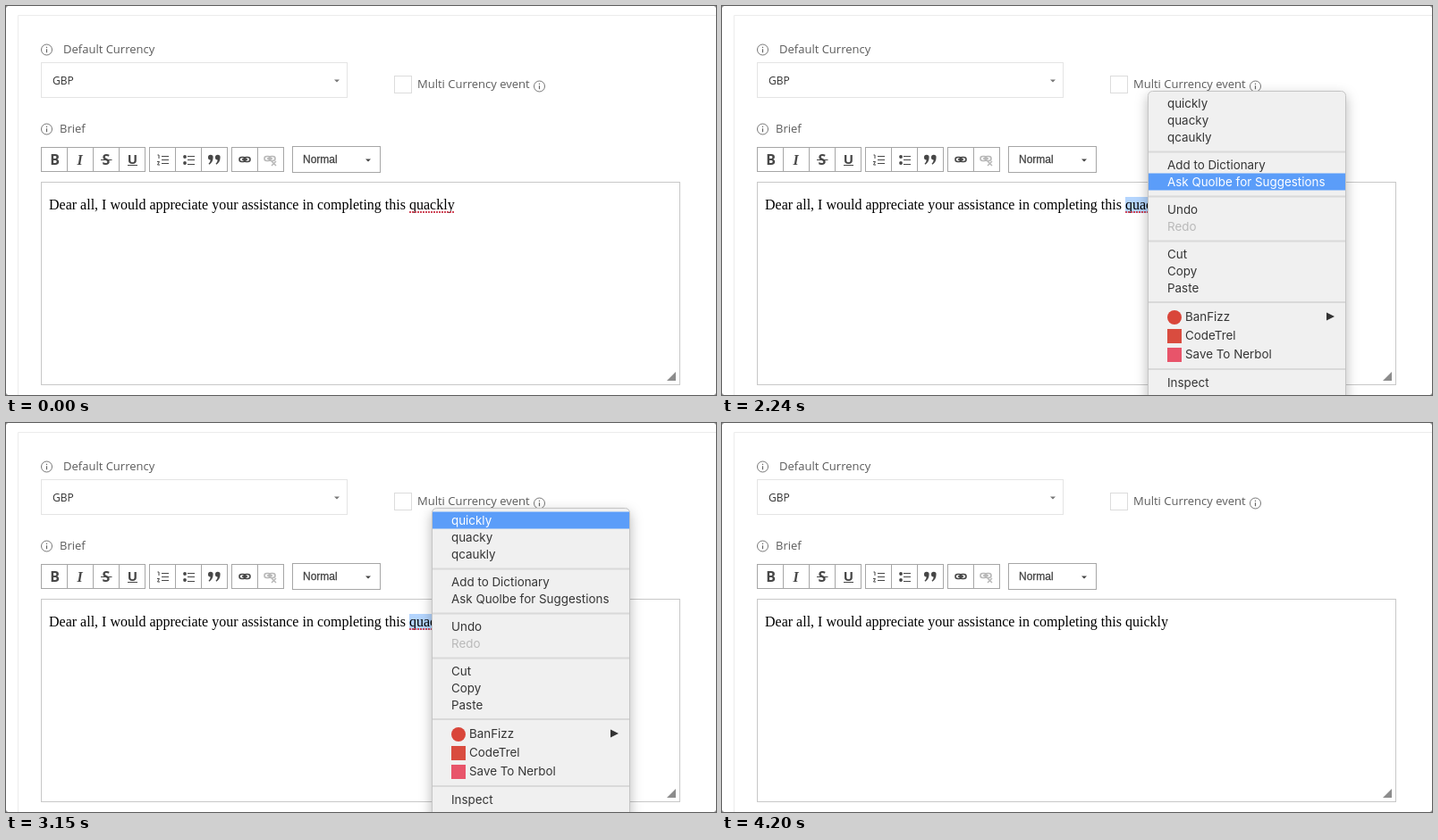
Animation of 794 by 436 pixels, one loop 4620 ms. Source, as an HTML page:

```html
<!DOCTYPE html>
<html lang="en">
<head>
<meta charset="utf-8">
<title>Spelling correction</title>
<style>
  html, body { margin: 0; width: 100%; height: 100%; overflow: hidden; background: #fff; }
  svg { display: block; width: 794px; height: 436px; }
  .label { font: 13px "Open Sans", sans-serif; fill: #5c5c5c; }
  .value { font: 12px "Open Sans", sans-serif; fill: #333; }
  .style { font: 12px "Liberation Sans", Arial, sans-serif; fill: #444; stroke: #444; stroke-width: .3; }
  .body { font: 16px "Liberation Serif", Times, serif; font-kerning: none; fill: #000; }
  .tool { font: bold 16px "Open Sans", sans-serif; fill: #474747; text-anchor: middle; }
  .item { font: 13.4px Inter, sans-serif; }
  .box { fill: #fff; stroke: #a6a6a6; }
  .icon { fill: none; stroke: #474747; }
  #menu { filter: drop-shadow(0 5px 7px rgba(0, 0, 0, .28)); }
</style>
</head>
<body>
<svg viewBox="0 0 794 436" xmlns="http://www.w3.org/2000/svg">
  <defs>
    <g id="info">
      <circle r="6" fill="none" stroke="#777"/>
      <path d="M0-3.2v1.3M0-.8v4" stroke="#666" stroke-width="1.2"/>
    </g>
    <g id="link" fill="none" stroke-width="1.6">
      <rect x="-6" y="-2.5" width="7" height="5" rx="2.5"/>
      <rect x="-1" y="-2.5" width="7" height="5" rx="2.5"/>
      <path d="M-3 0H3"/>
    </g>
    <path id="down" d="M-3-1.5h6L0 1.5z"/>
  </defs>

  <rect width="794" height="436" fill="#fff"/>
  <path d="M13.5 436V10.5H794" fill="none" stroke="#ececec"/>
  <path d="M0 0h2L0 2zM794 0v2l-2-2zM0 436v-2l2 2zM794 436h-2l2-2z" fill="#999"/>

  <use href="#info" x="45.5" y="49"/>
  <text class="label" x="64" y="53">Default Currency</text>
  <rect x="39.5" y="63.5" width="342" height="39" fill="#fff" stroke="#e4e4e4"/>
  <text class="value" x="52" y="88">GBP</text>
  <use href="#down" x="370" y="84" fill="#777"/>
  <rect x="434.5" y="78.5" width="19" height="19" fill="#fff" stroke="#dcdcdc"/>
  <text class="label" x="460" y="92">Multi Currency event</text>
  <use href="#info" x="596.5" y="90"/>
  <use href="#info" x="45.5" y="138"/>
  <text class="label" x="60" y="142">Brief</text>

  <g id="tools"></g>
  <g class="tool">
    <text x="54.5" y="178">B</text>
    <text x="82.5" y="178" font-family="'Liberation Serif', serif" font-style="italic">I</text>
    <text x="112" y="178">S</text>
    <text x="141.5" y="177" style="font-size:15px">U</text>
  </g>
  <path class="icon" d="M106 172.5h12.5M136 178.5h11" stroke-width="1.2"/>
  <path class="icon" d="M174 168.5h8M174 172.5h8M174 176.5h8M203 168.5h8M203 172.5h8M203 177.5h8"/>
  <path class="icon" d="M169.5 167h1.5v4M169 174.500h2.500l-2 3.500h2.500"/>
  <g fill="#474747">
    <circle cx="200" cy="169" r="1.9"/>
    <circle cx="200" cy="176" r="1.9"/>
    <path id="comma" d="M226 169.500a2.800 2.800 0 1 1 5.600 0c0 4-1.600 6.500-4.300 8.300l-.8-1c1.500-1.500 2-2.700 2.100-4.400a2.700 2.700 0 0 1-2.600-2.900z"/>
    <use href="#comma" x="8"/>
  </g>
  <use href="#link" x="267" y="172" stroke="#474747"/>
  <g stroke="#b8b8b8">
    <use href="#link" x="295" y="171"/>
    <path d="M297 174l5 5m0-5l-5 5" stroke-width="1.5"/>
  </g>
  <rect class="box" x="320.500" y="157.500" width="98" height="29"/>
  <text class="style" x="332" y="176">Normal</text>
  <use href="#down" x="405" y="173" fill="#444"/>

  <rect x="39.500" y="197.500" width="714" height="227" fill="#fff" stroke="#c8c8c8"/>
  <path d="M749 410v10h-10z" fill="#8c8c8c"/>
  <rect id="selection" x="451" y="214" width="51" height="18" fill="#b4d5fe"/>
  <text class="body" x="48" y="228">Dear all, I would appreciate your assistance in completing this</text>
  <g id="wrong">
    <text class="body" x="451" y="228">quackly</text>
    <path d="M451 231H501" stroke="#d0485a" stroke-width="2" stroke-dasharray="2 1"/>
  </g>
  <text class="body" id="right" x="451" y="228">quickly</text>
  <rect id="caretMid" x="474" y="214" width="1" height="18"/>
  <rect id="caretEnd" x="499" y="214" width="1" height="18"/>

  <g id="menu">
    <rect x="476.500" y="95.500" width="221" height="360" rx="5" fill="#f0f0f0" stroke="#c4c4c4"/>
    <path d="M477 163.500h220m-220 50h220m-220 50h220m-220 68.500h220m-220 75h220" stroke="#d9d9d9" stroke-width="2"/>
    <g id="items"></g>
    <circle cx="506" cy="349" r="8" fill="#d9463a"/>
    <rect x="498" y="362" width="16" height="16" fill="#d94c3f"/>
    <rect x="498" y="383" width="16" height="16" fill="#e8546a"/>
    <path d="M676 343.500l9 4.500-9 4.500z" fill="#333"/>
  </g>
</svg>

<script>
const LOOP = 4620;
const byId = id => document.getElementById(id);

function add(parent, tag, attrs, text = '') {
  const el = document.createElementNS('http://www.w3.org/2000/svg', tag);
  for (const name in attrs) el.setAttribute(name, attrs[name]);
  el.textContent = text;
  parent.append(el);
  return el;
}

// Plays a table of [time, value] steps with hard changes.
function play(el, prop, steps) {
  const frames = [...steps, [LOOP, steps.at(-1)[1]]].map(([time, value]) =>
    ({ offset: time / LOOP, [prop]: value, easing: 'step-end' }));
  el.animate(frames, { duration: LOOP, iterations: Infinity });
}

const show = (id, from, to) =>
  play(byId(id), 'opacity', from ? [[0, 0], [from, 1], [to, 0]] : [[0, 1], [to, 0]]);

// Toolbar groups: left edge and number of buttons
for (const [left, count] of [[39, 4], [160, 3], [252, 2]]) {
  for (let i = 0; i < count; i++) {
    add(byId('tools'), 'rect', { class: 'box', x: left + i * 29 + .5, y: 158.5, width: 29, height: 27 });
  }
}

const items = [
  ['quickly', 109], ['quacky', 128], ['qcaukly', 147],
  ['Add to Dictionary', 178], ['Ask Quolbe for Suggestions', 197],
  ['Undo', 228], ['Redo', 247],
  ['Cut', 278], ['Copy', 297], ['Paste', 316],
  ['BanFizz', 348, 518], ['CodeTrel', 369, 518], ['Save To Nerbol', 390, 518],
  ['Inspect', 422]
];

// Highlighted menu row over time; the short gap is the click blink
const active = [
  [0, -1], [2170, 5], [2240, 4], [2310, 3], [2380, 2], [2450, 1],
  [2520, 0], [3290, -1], [3360, 0], [3570, -1]
];

items.forEach(([name, y, x = 498], row) => {
  const fill = name === 'Redo' ? '#b9b9b9' : '#353535';
  const bar = add(byId('items'), 'rect', { x: 477, y: y - 9.5, width: 220, height: 19, fill: '#5b9df9', opacity: 0 });
  const label = add(byId('items'), 'text', { class: 'item', x, y: y + 5, fill }, name);
  if (active.some(([, i]) => i === row)) {
    play(bar, 'opacity', active.map(([t, i]) => [t, i === row ? 1 : 0]));
    play(label, 'fill', active.map(([t, i]) => [t, i === row ? '#fff' : fill]));
  }
});

show('wrong', 0, 3710);
show('right', 3710, LOOP - 1);
show('selection', 1750, 3710);
show('caretMid', 1120, 1610);
show('caretEnd', 3710, 4200);
play(byId('menu'), 'opacity', [[0, 0], [1820, 1], [3430, .75], [3500, .41], [3570, 0]]);
</script>
</body>
</html>
```
